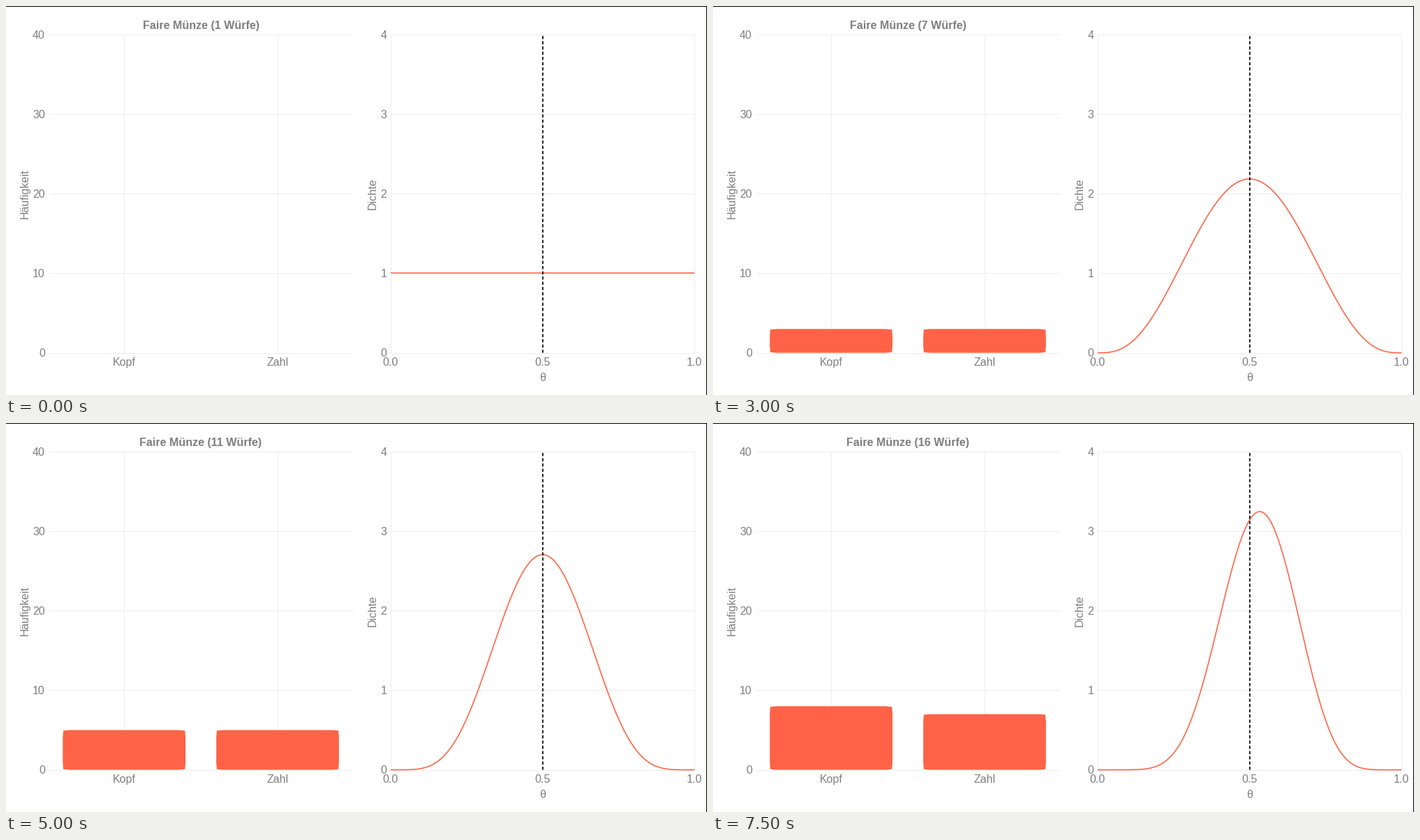
These frames come from a looping animation (1004 by 558 pixels, 8000 ms). A matplotlib script:

```python
import math

import matplotlib.pyplot as plt
import numpy as np
from matplotlib.animation import FuncAnimation
from matplotlib.patches import Polygon, Rectangle

W, H, DPI = 1004, 558, 64
TOMATO, GRAY, GRID = "#ff6347", "#7f7f7f", "#ededed"
TOSSES = "ZZKZKKKZZKKZZKK"

LEFT = (61.5, 496.5)
RIGHT = (551.0, 986.0)
TOP, BOTTOM = 41.4, 497.5
HEIGHT = BOTTOM - TOP
BAR_X = (169.2, 389.0)
BAR_W = 175.7

plt.rcParams["font.family"] = "Liberation Sans"
fig = plt.figure(figsize=(W / DPI, H / DPI), dpi=DPI, facecolor="white")
ax = fig.add_axes([0, 0, 1, 1])
ax.set_xlim(0, W)
ax.set_ylim(H, 0)
ax.axis("off")


def px(n):
    return n * 72 / DPI


def line(x, y, color, width=1.0, **kw):
    return ax.plot(x, y, color=color, lw=px(width),
                   solid_capstyle="butt", **kw)[0]


def label(x, y, text, ha="center", **kw):
    return ax.text(x, y, text, ha=ha, va="baseline", color=GRAY,
                   fontsize=px(16), rotation_mode="anchor", **kw)


def draw_axes():
    for i in range(5):
        y = BOTTOM - i * HEIGHT / 4
        for side, step in ((LEFT, 10), (RIGHT, 1)):
            line(side, (y, y), GRID, zorder=1)
            label(side[0] - 5.7, y + 5.4, str(i * step), ha="right")
    for x, name in zip(BAR_X, ("Kopf", "Zahl")):
        line((x, x), (TOP, BOTTOM), GRID, zorder=1)
        label(x, 516.2, name)
    for v in (0, 0.5, 1):
        x = RIGHT[0] + v * (RIGHT[1] - RIGHT[0])
        line((x - 0.5, x - 0.5), (TOP, BOTTOM), GRID, zorder=1)
        label(x - 0.3, 516.2, f"{v:.1f}")
    label(768.2, 537.8, "θ")
    label(32, 269.5, "Häufigkeit", rotation=90)
    label(529.8, 269.5, "Dichte", rotation=90)
    # thin black border along the top and right edges
    ax.add_patch(Rectangle((0, 0), W, 1, color="black", lw=0))
    ax.add_patch(Rectangle((W - 1, 0), 1, H, color="black", lw=0))


def bar_shape(center, count):
    """Bar outline with very slightly softened corners."""
    x0, x1 = center - BAR_W / 2, center + BAR_W / 2
    y0, y1 = BOTTOM - count * HEIGHT / 40, BOTTOM
    if count == 0:
        return [(x0, y1)] * 3
    c, dx, dy = 0.8, 10, min(10, (y1 - y0) / 2)
    return [(x0 + c, y0 + c), (x0 + dx, y0), (x1 - dx, y0), (x1 - c, y0 + c),
            (x1, y0 + dy), (x1, y1 - dy), (x1 - c, y1 - c), (x1 - dx, y1),
            (x0 + dx, y1), (x0 + c, y1 - c), (x0, y1 - dy), (x0, y0 + dy)]


draw_axes()
title = label(279, 33.4, "", fontweight="bold")
bars = [ax.add_patch(Polygon([(0, 0)] * 3, fc=TOMATO, lw=0, zorder=2))
        for _ in BAR_X]
theta = np.linspace(0, 1, 300)
curve = line(RIGHT[0] + theta * (RIGHT[1] - RIGHT[0]), theta, TOMATO, 1.6,
             zorder=3)
line((768.8, 768.8), (BOTTOM, TOP), "black", 1.7, zorder=4, snap=False,
     dashes=(4.5 / 1.7, 3 / 1.7), dash_capstyle="butt")


def update(n):
    seen = TOSSES[:n]
    heads, tails = seen.count("K"), seen.count("Z")
    title.set_text(f"Faire Münze ({n + 1} Würfe)")
    for bar, x, count in zip(bars, BAR_X, (heads, tails)):
        bar.set_xy(bar_shape(x, count))
    # posterior Beta(heads + 1, tails + 1)
    norm = (n + 1) * math.comb(n, heads)
    density = norm * theta**heads * (1 - theta)**tails
    curve.set_ydata(BOTTOM - density * HEIGHT / 4)
    return [title, curve, *bars]


anim = FuncAnimation(fig, update, frames=len(TOSSES) + 1, interval=500,
                     repeat=True, repeat_delay=0, blit=False)
plt.show()
```
